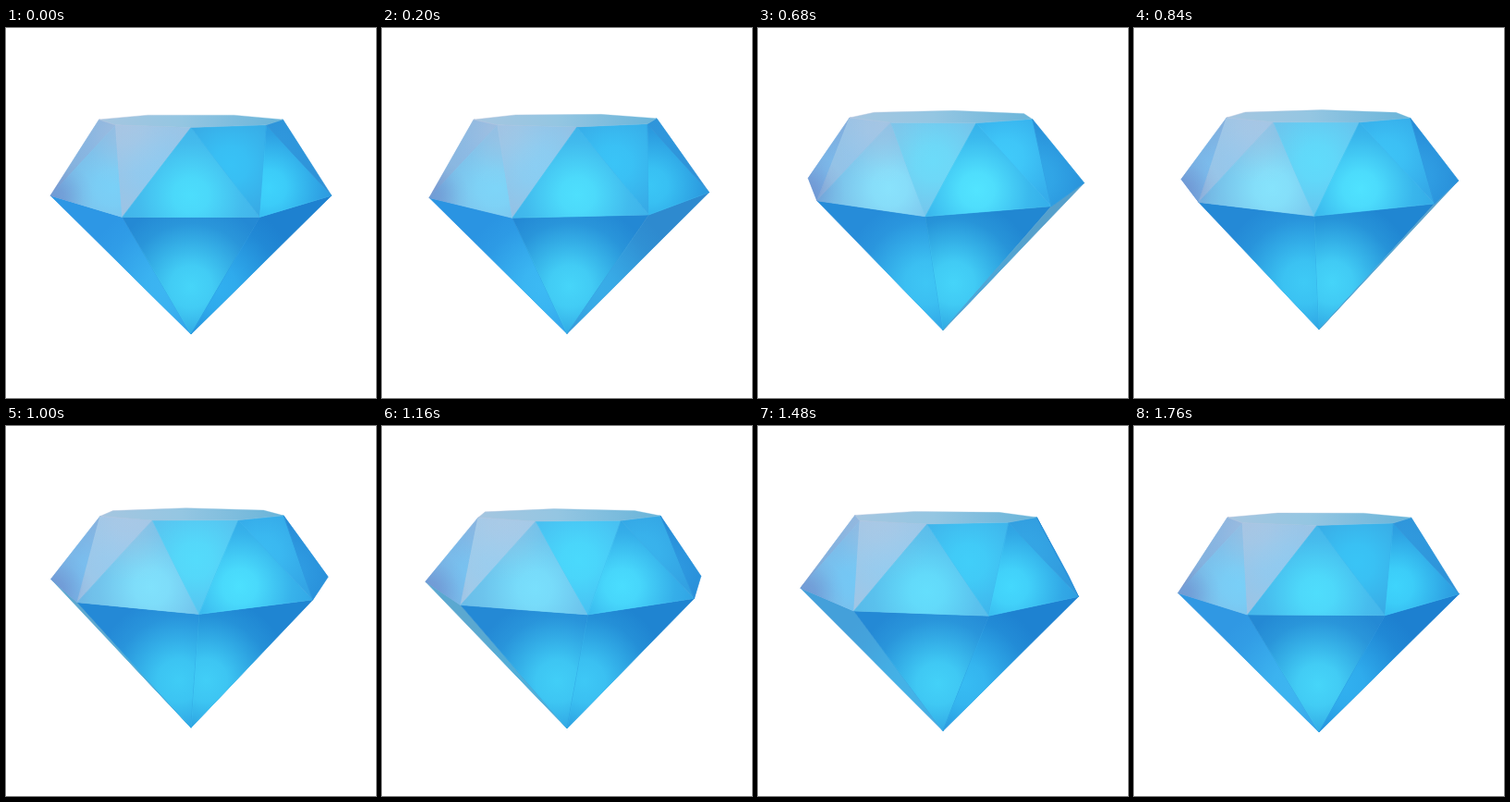
Write an HTML page with a canvas that moves like this. It is 400x400 px and loops after 1800 ms.

```html
<!DOCTYPE html>
<html lang="en">
<head>
<meta charset="utf-8">
<title>Turning gem</title>
<style>
  html, body { margin: 0; width: 100%; height: 100%; overflow: hidden; background: #fff; }
  canvas { display: block; width: 400px; height: 400px; }
</style>
</head>
<body>
<canvas id="gem" width="400" height="400"></canvas>
<script>
const ctx = document.getElementById('gem').getContext('2d');
const LOOP = 1800, TICK = 40, SIDES = 7, STEP = 360 / SIDES, MID = 200;

// Rings of the gem: radius, its widening (linear, square), centre height, depth, depth curve.
const GIRDLE = { r: 154, k: 0.03, q: 0.105, y: 174.8, d: 27, e: 0.24 };
const TABLE = { r: 101.5, k: 0, q: 0.07, y: 100.5, d: 7, e: 0 };

// Face tints by heading in degrees: [heading, base, glow].
const UPPER = [
  [-105, '#6f94cf', '#86b0e4'],
  [-60, '#7fb4e2', '#74c8f5'],
  [-30, '#78bce6', '#8ae4fc'],
  [-15, '#66bfea', '#74defc'],
  [0, '#42b4ea', '#4cddfc'],
  [20, '#36b0ea', '#52e4ff'],
  [51, '#2b97de', '#3ed4fc'],
  [75, '#2588d4', '#309fe4'],
  [105, '#2484d0', '#2a90dc']
];
const STAR = [
  [-80, '#83aed8', '#84b4e2'],
  [-45, '#a3c8e6', '#98cef0'],
  [-26, '#9fc2e2', '#8ecaf0'],
  [-14, '#8cbce2', '#84d2f6'],
  [-5, '#74c2ea', '#68dcfa'],
  [7, '#47bdf0', '#4adafc'],
  [26, '#38a6e2', '#38c2f6'],
  [45, '#34a8e8', '#40cafa'],
  [77, '#2e90d6', '#2f98dd']
];
const LOWER = [
  [-70, '#5ca8d0', '#4cb0dc'],
  [-51, '#2c97e5', '#3cb6f3'],
  [-27, '#2489d6', '#3ecaf6'],
  [0, '#2489d4', '#46d5f9'],
  [24, '#2086d2', '#45d4f9'],
  [51, '#1d80d0', '#30b0f0'],
  [72, '#58a2cc', '#4fa8d8']
];

const rgb = hex => [1, 3, 5].map(i => parseInt(hex.slice(i, i + 2), 16));
const css = (c, a = 1) => `rgba(${c.map(Math.round)},${a})`;
const mix = (a, b, u) => a.map((v, i) => v + (b[i] - v) * u);

function tint(stops, deg) {
  let i = 1;
  while (i < stops.length - 1 && stops[i][0] < deg) i++;
  const [a, b] = [stops[i - 1], stops[i]];
  const u = Math.min(1, Math.max(0, (deg - a[0]) / (b[0] - a[0])));
  return [1, 2].map(n => mix(rgb(a[n]), rgb(b[n]), u));
}

function ringPoint(ring, deg, lift) {
  const a = deg * Math.PI / 180, c = Math.cos(a);
  return [
    MID + ring.r * Math.sin(a) * (1 + ring.k * c + ring.q * c * c),
    ring.y + ring.d * c * (1 + ring.e * c) - lift
  ];
}

function radial(x, y, r, color, strength) {
  const g = ctx.createRadialGradient(x, y, 0, x, y, r);
  [[0, 1], [0.25, 0.88], [0.5, 0.52], [0.75, 0.17], [1, 0]]
    .forEach(([at, a]) => g.addColorStop(at, css(color, a * strength)));
  return g;
}

function trace(points) {
  ctx.beginPath();
  points.forEach(p => ctx.lineTo(...p));
  ctx.closePath();
}

// Fill the current path, with a hairline to close the seams.
function paint(style) {
  ctx.fillStyle = ctx.strokeStyle = style;
  ctx.fill();
  ctx.stroke();
}

const facing = ([a, b, c]) =>
  (b[0] - a[0]) * (c[1] - a[1]) - (b[1] - a[1]) * (c[0] - a[0]) > 0;

function face(points, stops, deg, lift) {
  if (!facing(points)) return;
  const [base, glow] = tint(stops, deg);
  const cx = (points[0][0] + points[1][0] + points[2][0]) / 3;
  const cy = (points[0][1] + points[1][1] + points[2][1]) / 3;
  trace(points);
  paint(css(base));
  if (stops === LOWER) {
    paint(radial(MID + (cx - MID) * 0.35, 280 - lift, 92, glow, 1));
    return;
  }
  paint(radial(MID + (cx - MID) * 0.82, cy + 9, 76, glow, 1));
  // Pale sheen at the upper left and violet at the left corner.
  const sheen = Math.min(1, Math.max(0, (5 - deg) / 30));
  paint(radial(132, 110 - lift, 62, [186, 200, 224], 0.42 * sheen));
  paint(radial(52, 182 - lift, 42, [104, 132, 200], 0.55 * sheen));
}

function drawTop(points) {
  const g = ctx.createLinearGradient(98, 0, 302, 0);
  g.addColorStop(0, '#a6c6e0');
  g.addColorStop(0.45, '#94c6e2');
  g.addColorStop(1, '#68b4d9');
  trace(points);
  ctx.fillStyle = g;
  ctx.fill();
  const rim = ctx.createLinearGradient(98, 0, 302, 0);
  rim.addColorStop(0, 'rgba(184,196,222,.8)');
  rim.addColorStop(1, 'rgba(120,190,224,.5)');
  ctx.strokeStyle = rim;
  ctx.stroke();
}

function draw(phase) {
  const turn = phase * STEP;
  const lift = 2.5 * (1 - Math.cos(phase * 2 * Math.PI));
  const tip = [MID, 331 - lift];
  const girdle = i => ringPoint(GIRDLE, (i - 0.5) * STEP + turn, lift);
  const top = i => ringPoint(TABLE, i * STEP + turn, lift);
  ctx.fillStyle = '#fff';
  ctx.fillRect(0, 0, 400, 400);
  ctx.lineWidth = 0.6;
  ctx.lineJoin = 'round';
  const ids = Array.from({ length: SIDES }, (_, i) => i - 3);
  for (const i of ids) {
    const deg = i * STEP + turn;
    face([girdle(i), girdle(i + 1), tip], LOWER, deg, lift);
  }
  for (const i of ids) {
    const deg = i * STEP + turn;
    face([top(i - 1), top(i), girdle(i)], STAR, deg - STEP / 2, lift);
    face([top(i), girdle(i + 1), girdle(i)], UPPER, deg, lift);
  }
  drawTop(ids.map(top));
}

const start = performance.now();
function tick() {
  const t = (performance.now() - start) % LOOP;
  draw(Math.floor(t / TICK) * TICK / LOOP);
  requestAnimationFrame(tick);
}
tick();
</script>
</body>
</html>
```
